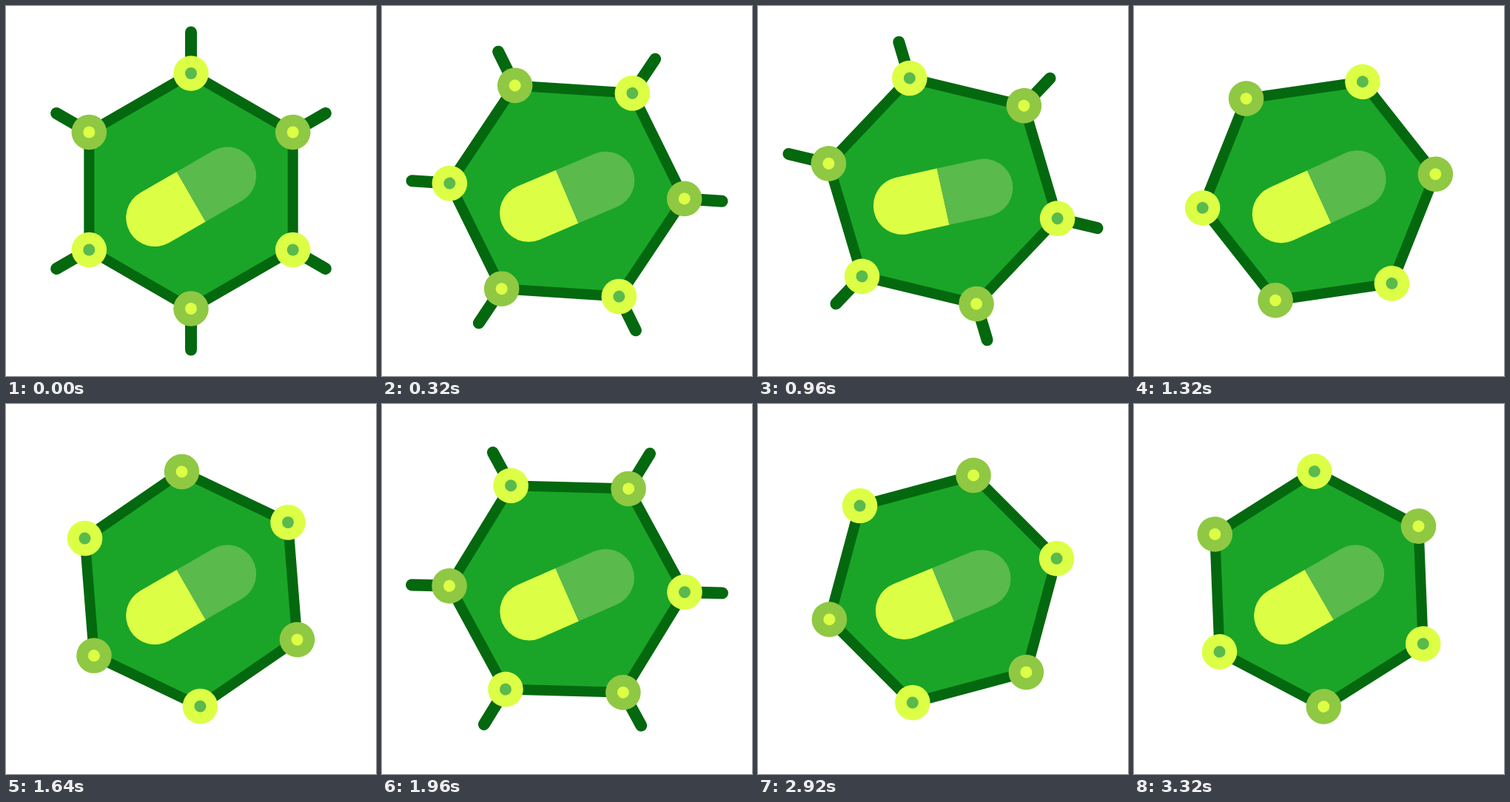
An HTML page for the animation above (3360 ms loop, 500x500 px).

```html
<!DOCTYPE html>
<html lang="en">
<head>
<meta charset="utf-8">
<title>Capsule in a turning hexagon</title>
<style>
  html, body { margin: 0; width: 100%; height: 100%; overflow: hidden; background: #fff; }
  svg { display: block; width: 100%; height: 100%; }
</style>
</head>
<body>
<svg viewBox="0 0 500 500">
  <g id="hexagon">
    <g id="spikes" stroke="#04680f" stroke-width="16" stroke-linecap="round"></g>
    <polygon id="body" fill="#1aa528" stroke="#04680f" stroke-width="14"/>
    <g id="nodes"></g>
  </g>
  <g id="pill">
    <path d="M0-39H-56.6a39 39 0 0 0 0 78H0z" fill="#dcff46"/>
    <path d="M0-39H56.6a39 39 0 0 1 0 78H0z" fill="#5aba4c"/>
  </g>
</svg>
<script>
const LOOP = 3360, STEP = 40;
const TURN = 80;            // ticks per half turn
const RADIUS = 159;
const $ = id => document.getElementById(id);

function add(parent, tag, attrs) {
  const el = document.createElementNS('http://www.w3.org/2000/svg', tag);
  for (const key in attrs) el.setAttribute(key, attrs[key]);
  parent.append(el);
}

const corners = [];
for (let i = 0; i < 6; i++) {
  const a = i * Math.PI / 3, x = Math.sin(a), y = -Math.cos(a);
  const cx = RADIUS * x, cy = RADIUS * y, tip = i % 3 ? 210 : 214.5;
  corners.push([cx, cy]);
  add($('spikes'), 'line', { x1: cx, y1: cy, x2: tip * x, y2: tip * y });
  add($('nodes'), 'circle', { cx, cy, r: 23.8, fill: i % 2 ? '#8fc843' : '#dcff46' });
  add($('nodes'), 'circle', { cx, cy, r: 8, fill: i % 2 ? '#dcff46' : '#5aba4c' });
}
$('body').setAttribute('points', corners.join(' '));

const ease = x => (1 - Math.cos(Math.PI * Math.min(x, 1))) / 2;

// Swings from -30 to -10 degrees and back, then rests
function pillAngle(tick) {
  const swing = tick < 37 ? ease(tick / 37) : 1 - ease((tick - 37) / 40);
  return -30 + 20 * swing;
}

function draw(now) {
  // Each step advances two ticks, with one tick dropped every 11 steps
  const step = Math.floor(now % LOOP / STEP);
  const ticks = 2 * step - Math.floor((step + 3) / 11);
  const phase = ticks % TURN;
  $('hexagon').setAttribute('transform', `translate(250 250) rotate(${ticks * 180 / TURN})`);
  $('pill').setAttribute('transform', `translate(250.2 257.7) rotate(${pillAngle(phase)})`);
  $('spikes').style.display = phase < 60 ? '' : 'none';
}

let start;
function frame(now) {
  start ??= now;
  draw(now - start);
  requestAnimationFrame(frame);
}
draw(0);
requestAnimationFrame(frame);
</script>
</body>
</html>
```
